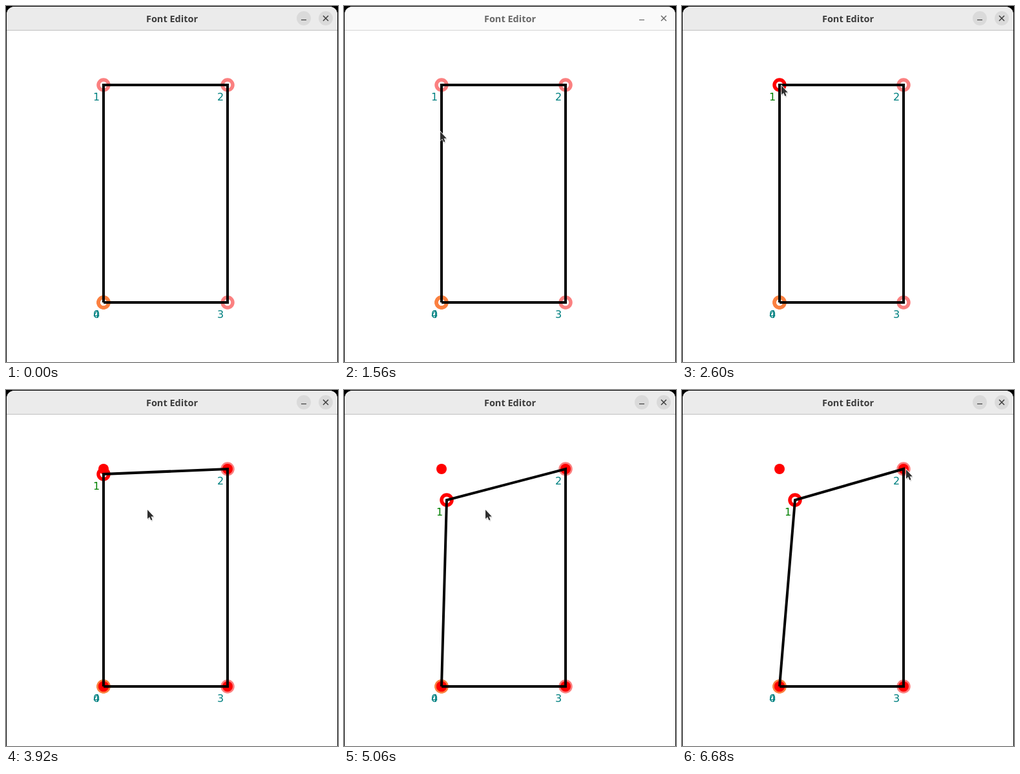
Write an HTML page that moves like this. It is 514 by 550 pixels and loops after 8 s.

```html
<!DOCTYPE html>
<html lang="en">
<head>
<meta charset="utf-8">
<title>Font Editor</title>
<style>
  html, body { margin: 0; width: 100%; height: 100%; overflow: hidden; background: #000; }
  svg { display: block; width: 514px; height: 550px; }
  .title { font: bold 14.5px "Open Sans", "Noto Sans", sans-serif; text-anchor: middle; }
  .label { font: 16px "DejaVu Sans", sans-serif; }
  .ring { fill: none; stroke-width: 5.5; }
  .icon { fill: none; stroke-width: 1.5; }
</style>
</head>
<body>
<svg viewBox="0 0 514 550">
  <path fill="#fff" d="M1 550V13A12 12 0 0 1 13 1H501A12 12 0 0 1 513 13V550Z"/>
  <path id="bar" d="M1 38V13A12 12 0 0 1 13 1H501A12 12 0 0 1 513 13V38Z"/>
  <rect id="edge" x="1" y="37" width="512" height="1"/>
  <g id="discs" fill="#dadada">
    <circle cx="461" cy="19" r="11"/>
    <circle cx="495" cy="19" r="11"/>
  </g>
  <text id="title" class="title" x="257" y="25">Font Editor</text>
  <g id="icons" class="icon">
    <path d="M457 21.5H465" stroke-width="1.2"/>
    <path d="M491 15L499 23M499 15L491 23"/>
  </g>
  <g id="rings"></g>
  <g id="dots" fill="#f00"></g>
  <path id="outline" fill="none" stroke="#000" stroke-width="4"/>
  <g id="labels"></g>
  <g id="cursor">
    <path id="shade" fill="#000" opacity=".18" transform="translate(1 2)"/>
    <path id="arrow" fill="#2e2e2e" stroke="#fff" stroke-width="1.5" paint-order="stroke"/>
  </g>
</svg>
<script>
const LOOP = 8000, TICK = 80;
const BLUR_AT = 580, CURSOR_AT = 1240, SELECT_AT = 2600, EDIT_AT = 3920;

const left = 151, top_ = 122, right = 343, bottom = 458;
const corners = [[left, bottom], [left, top_], [right, top_], [right, bottom], [left, bottom]];
const SELECTED = 1;
const ringColor = i => i % 4 ? "#fb8080" : "#fb8040";

// Each pointer move is a curve from one resting place to the next, bent by a control point
const rest = [66, 369], onCorner = [154, 123], aside = [219, 185], onNext = [347, 123];
const moves = [
  { start: 1320, steps: 12, from: rest, bend: [200, 110], to: onCorner },
  { start: 3020, steps: 3, from: onCorner, bend: [190, 150], to: aside },
  { start: 5880, steps: 10, from: aside, bend: [246, 176], to: onNext }
];

// A held arrow key nudges once, waits, then repeats
const GRID = 8, REPEAT = 140;
const downKey = { start: EDIT_AT, delay: 250, count: 6 };
const rightKey = { start: 5060, delay: 160, count: 3 };

const $ = id => document.getElementById(id);
function set(node, attrs) {
  for (const key in attrs) node.setAttribute(key, attrs[key]);
  return node;
}
function add(parent, tag, attrs) {
  const node = document.createElementNS("http://www.w3.org/2000/svg", tag);
  return $(parent).appendChild(set(node, attrs));
}
const show = (id, on) => set($(id), { visibility: on ? "visible" : "hidden" });
const toTick = time => Math.floor(time / TICK) * TICK;

const rings = corners.map(([x, y], i) =>
  add("rings", "circle", { class: "ring", cx: x, cy: y, r: 8, stroke: ringColor(i) }));
const labels = corners.map(([x, y], i) => {
  const label = add("labels", "text", { class: "label", x: x - 16, y: y + 24, fill: "#008080" });
  label.textContent = i;
  return label;
});
corners.forEach(([x, y]) => add("dots", "circle", { cx: x, cy: y, r: 8 }));
for (const id of ["shade", "arrow"])
  set($(id), { d: "M0 0V14L3.2 11.3L5.4 16.3L7.6 15.3L5.5 10.5H9.8Z" });

function nudges({ start, delay, count }, t) {
  if (t < start) return 0;
  let n = 1;
  while (n < count && t >= start + delay + toTick((n - 1) * REPEAT)) n++;
  return n * GRID;
}

function pointerAt(t) {
  const move = moves.findLast(m => t >= m.start);
  if (!move) return rest;
  const u = Math.min(1, toTick(t - move.start) / (move.steps * TICK));
  const e = 1 - (1 - u) ** 2;
  return move.from.map((a, i) =>
    (1 - e) ** 2 * a + 2 * e * (1 - e) * move.bend[i] + e * e * move.to[i]);
}

function render(t) {
  const focused = t < BLUR_AT || t >= SELECT_AT;
  const ink = focused ? "#3d3d3d" : "#696969";
  set($("bar"), { fill: focused ? "#ebebeb" : "#fafafa" });
  set($("edge"), { fill: focused ? "#bfbfbf" : "#d5d5d5" });
  set($("title"), { fill: ink });
  set($("icons"), { stroke: ink });
  show("discs", focused);

  const selected = t >= SELECT_AT;
  const x = left + nudges(rightKey, t);
  const y = top_ + nudges(downKey, t);
  set(rings[SELECTED], { cx: x, cy: y, stroke: selected ? "#f00" : ringColor(SELECTED) });
  set(labels[SELECTED], { x: x - 16, y: y + 24, fill: selected ? "#008000" : "#008080" });
  const shape = corners.map((point, i) => i === SELECTED ? [x, y] : point);
  set($("outline"), { d: "M" + shape.join("L") });
  show("dots", t >= EDIT_AT);

  show("cursor", t >= CURSOR_AT);
  set($("cursor"), { transform: `translate(${pointerAt(t).map(Math.round)})` });
}

function frame() {
  render(performance.now() % LOOP);
  requestAnimationFrame(frame);
}
frame();
</script>
</body>
</html>
```
